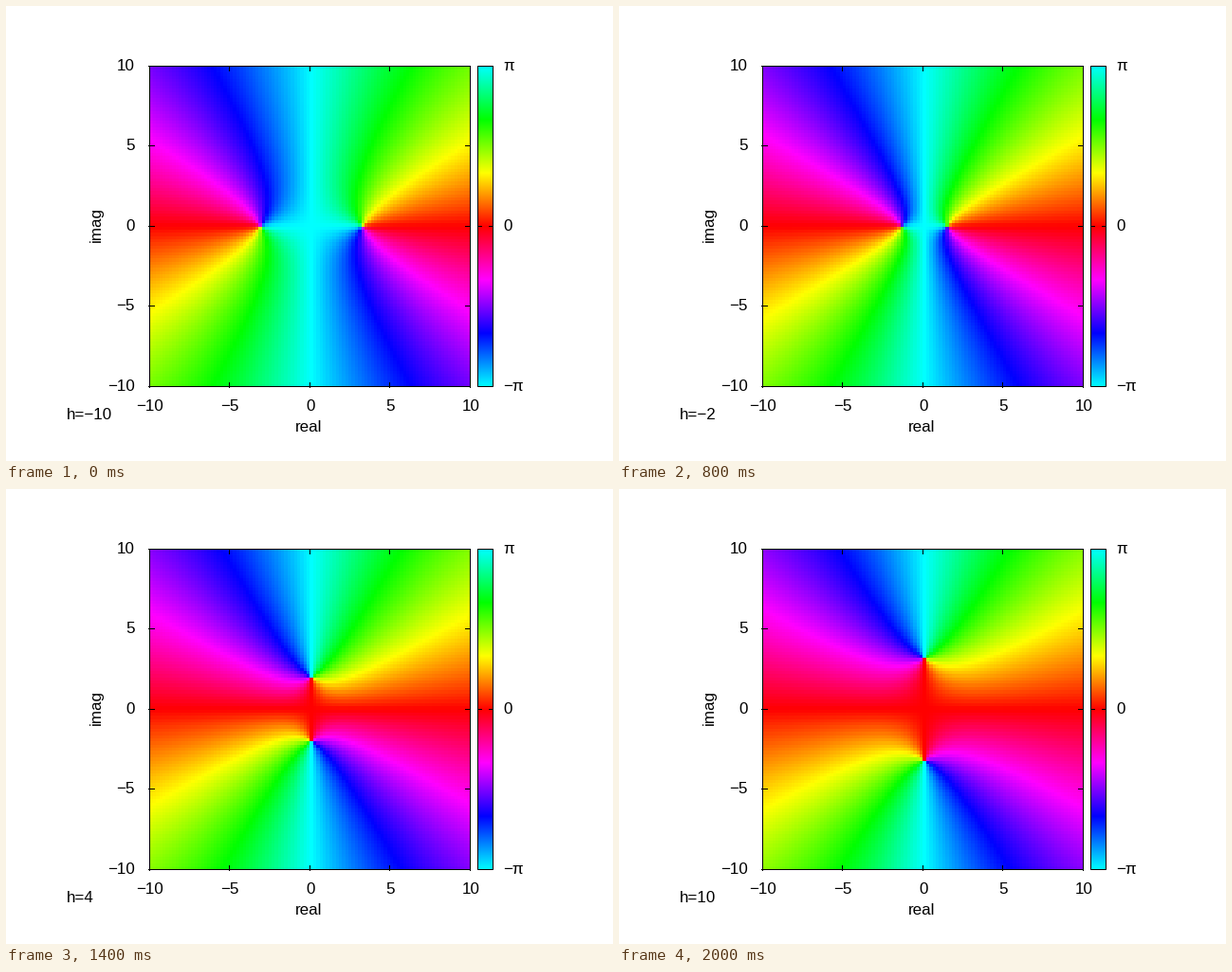
Recreate the animation shown at these times as a matplotlib script. Size 640x480 px, loop 2.1 s.

```python
import matplotlib.pyplot as plt
import numpy as np
from matplotlib.animation import FuncAnimation
from matplotlib.colors import hsv_to_rgb
from matplotlib.patches import Rectangle

W, H, DPI = 640, 480, 100
PX = 72 / DPI                       # one pixel in points
L, R, T, B = 151, 489, 63, 401      # border pixels of the plot
BAR_L, BAR_R = 497, 513
CELLS = 100
TICKS = (-10, -5, 0, 5, 10)

plt.rcParams["font.family"] = "Liberation Sans"
fig = plt.figure(figsize=(W / DPI, H / DPI), dpi=DPI, facecolor="white")
ax = fig.add_axes([0, 0, 1, 1])
ax.axis("off")


def phase_rgb(phase):
    hue = (phase / (2 * np.pi)) % 1.0
    one = np.ones_like(hue)
    return hsv_to_rgb(np.stack([hue, one, one], axis=-1))


# Each cell takes its colour from its left edge, halfway up.
step = 20 / CELLS
re = np.round(-10 + step * np.arange(CELLS), 9)
im = -10 + step * (np.arange(CELLS) + 0.5)
cell = np.minimum(np.arange(R - L + 1) * CELLS // (R - L), CELLS - 1)
X, Y = np.meshgrid(re[cell], im[cell])


def field(h):
    return phase_rgb(np.arctan2(2 * X * Y, X**2 - Y**2 + h))


def picture(data, left, right):
    return ax.imshow(data, extent=(left, right + 1, B + 1, T), origin="lower",
                     interpolation="nearest", aspect="auto", zorder=1)


def frame(left, right):
    ax.add_patch(Rectangle((left + 0.5, T + 0.5), right - left, B - T,
                           fill=False, ec="black", lw=PX, snap=False,
                           zorder=3))


def line(x0, y0, x1, y1):
    ax.plot([x0, x1], [y0, y1], color="black", lw=PX, snap=False,
            solid_capstyle="butt", zorder=3)


def label(x, y, s, ha="center"):
    return ax.text(x, y, s, ha=ha, va="baseline", fontsize=17 * PX,
                   color="black")


def signed(n):
    return str(n).replace("-", "\u2212")


plane = picture(field(-10), L, R)
ramp = np.linspace(-np.pi, np.pi, B - T + 1)
picture(phase_rgb(ramp)[:, None, :], BAR_L, BAR_R)
frame(L, R)
frame(BAR_L, BAR_R)

for v in TICKS:
    part = (v + 10) / 20
    x = np.floor(L + (R - L) * part) + 0.5
    y = np.floor(B - (B - T) * part) + 0.5
    line(x, B + 2, x, B - 4)
    line(x, T, x, T + 6)
    line(L - 1, y, L + 6, y)
    line(R + 1, y, R - 5, y)
    label(x + 0.5, 427, signed(v))
    label(135.5, y + 4.5, signed(v), ha="right")

mid = (T + B) / 2 + 0.5
line(BAR_L, mid, BAR_L + 5, mid)
line(BAR_R + 1, mid, BAR_R - 4, mid)
for y, s in ((T + 0.5, "\u03c0"), (mid, "0"), (B + 0.5, "\u2212\u03c0")):
    label(524, y + 4.5, s, ha="left")

label(319, 449, "real")
ax.text(103, 230.5, "imag", rotation=90, ha="right", va="center",
        fontsize=17 * PX)
param = label(63.5, 435.5, "", ha="left")

ax.set_xlim(0, W)
ax.set_ylim(H, 0)


def update(i):
    h = i - 10
    plane.set_data(field(h))
    param.set_text(f"h={signed(h)}")
    return plane, param


anim = FuncAnimation(fig, update, frames=21, interval=100, repeat=True,
                     repeat_delay=0, blit=False)
plt.show()
```
